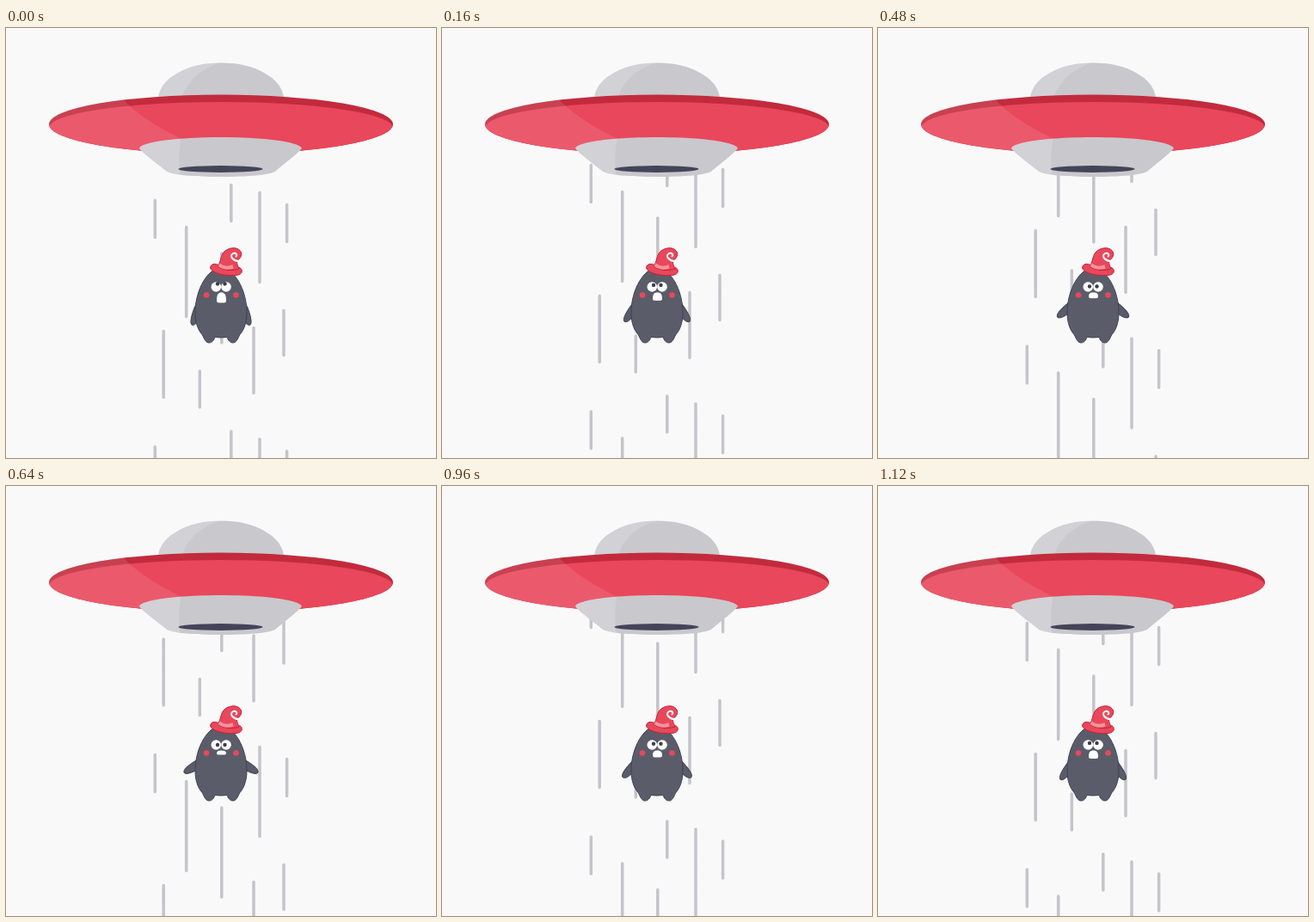
An HTML page for the animation above (1.28 s loop, 500 px wide and 500 px high).

```html
<!DOCTYPE html>
<html lang="en">
<head>
<meta charset="utf-8">
<title>Abduction</title>
<style>
  html, body { margin: 0; width: 100%; height: 100%; overflow: hidden; background: #f9f9f9; }
  svg { display: block; width: 100vw; height: 100vh; }
</style>
</head>
<body>
<svg viewBox="0 0 500 500">
  <defs>
    <clipPath id="below"><rect y="125" width="500" height="375"/></clipPath>
    <clipPath id="disc"><ellipse cx="250" cy="112" rx="200" ry="34.500"/></clipPath>
    <path id="base" d="M155 139.500C160 132 200 127 250 127C300 127 339 132 344 139.500C342 144 328 154 314 166C309 171 280 173 250 173C220 173 191 171 186 166C171 154 157 144 155 139.500Z"/>
    <clipPath id="baseClip"><use href="#base"/></clipPath>
    <path id="arm" d="M-5 -2C-5 7 -4.500 19 0 19C4.500 19 5 7 5 -2Z"/>
  </defs>

  <g clip-path="url(#below)">
    <path id="beam" fill="none" stroke="#c5c4ca" stroke-width="3.500" stroke-linecap="round"/>
  </g>

  <g id="ship">
    <path fill="#c9c8cd" d="M177 80C180 66 188 59 200 52Q220 40.500 250 40.500Q280 40.500 300 52C312 59 320 66 323 80Z"/>
    <path fill="#fff" opacity=".17" d="M177 80C180 66 188 59 200 52Q220 40.500 248 40.500C226 48 211 61 205 80Z"/>
    <g clip-path="url(#disc)">
      <path fill="#c22b3d" d="M50 77H450V150H50Z"/>
      <path fill="#e9475b" d="M50 116A200 30 0 0 1 450 116V150H50Z"/>
      <path fill="#fff" opacity=".1" d="M40 70H132L135 82Q157 106 204 129V150H40Z"/>
    </g>
    <use href="#base" fill="#c9c8cd"/>
    <path clip-path="url(#baseClip)" fill="#fff" opacity=".17" d="M150 120H205Q199 146 203 175H150Z"/>
    <ellipse cx="249.500" cy="164" rx="49" ry="3.900" fill="#444459"/>
  </g>

  <g id="creature">
    <g fill="#5a5d69" stroke="#3f4152" stroke-width="1">
      <use id="armL" href="#arm"/>
      <use id="armR" href="#arm"/>
      <path d="M250 279C265 279 280 304 280 331C280 344 276 352 271.500 357C269 363 267 366 264 366C260 366 258.500 363 257 359.500Q250 360.500 243 359.500C241.500 363 240 366 236 366C233 366 231 363 228.500 357C224 352 220 344 220 331C220 304 235 279 250 279Z"/>
    </g>
    <g fill="#e9475b">
      <circle cx="233" cy="310.500" r="3.300"/>
      <circle cx="267.500" cy="310.500" r="3.300"/>
    </g>
    <g fill="#fff">
      <circle cx="244.300" cy="301" r="5.800"/>
      <circle cx="256" cy="301" r="5.800"/>
      <path id="mouth"/>
    </g>
    <g fill="#3d3e4c">
      <circle id="pupilL" r="2.200"/>
      <circle id="pupilR" r="2.200"/>
    </g>
    <g stroke="#c3223a" stroke-width="1" stroke-linejoin="round" fill="#e9475b">
      <path d="M241 274.500C246 274 250 277 258 279C265 280 272 276 274 281C276 287 268 288.500 258 287.500C249 287 239 284 237.500 279Q237.500 275.500 241 274.500Z"/>
      <path d="M246 277C250 273 249 263 255 259C262 254 271 255 273.500 261C275 267 269 270 268.500 271C268 274 270 277 271 280C263 283 252 281.500 246 277Z"/>
      <path fill="#f4929a" stroke="none" d="M248.500 273.500C254 277.500 259 277.500 263.500 275L264.500 279.500C258 282 251 280.500 246.500 277Z"/>
      <path fill="none" stroke="#fff" stroke-width="2" stroke-linecap="round" d="M271 271.500C264 270.500 259.500 265.500 263.500 262.500C267 260.500 269.500 263.500 267.500 265.500"/>
    </g>
  </g>
</svg>
<script>
const $ = id => document.getElementById(id);
const STEP = 160, PERIOD = 286.5;

// x, top, length of each beam streak
const streaks = [
  [173.3, 200.5, 43], [183.2, 352.5, 77], [209.7, 231.5, 104], [225.3, 399, 42],
  [250.8, 262, 104], [261.8, 182.5, 42], [288, 348.5, 76], [295, 191.5, 104],
  [323, 328.5, 52], [326.6, 205.5, 43]
];

// Poses from fully scared to calm; the loop runs there and back
const poses = [
  { rise: 0, arm: 21, drop: 4, look: -3.5, mouth: 12 },
  { rise: 41, arm: 36, drop: 2.5, look: -2, mouth: 9.5 },
  { rise: 79, arm: 44, drop: 1.5, look: -1.2, mouth: 8 },
  { rise: 117, arm: 51, drop: .7, look: -.5, mouth: 6.8 },
  { rise: 174.5, arm: 59, drop: 0, look: 0, mouth: 5 }
];

function beamPath(rise) {
  let d = '';
  for (const [x, top, len] of streaks) {
    for (let k = -1; k < 3; k++) {
      d += `M${x} ${top - rise + k * PERIOD}v${len}`;
    }
  }
  return d;
}

function mouthPath(h) {
  const r = Math.min(2.5, h / 3), top = 307.5, end = top + h;
  return `M245 ${end - r}C245 ${top + h * .2} 247 ${top} 250.5 ${top}` +
    `C254 ${top} 256 ${top + h * .2} 256 ${end - r}` +
    `Q256 ${end} ${256 - r} ${end}H${245 + r}Q245 ${end} 245 ${end - r}Z`;
}

function place(id, x, y) {
  $(id).setAttribute('cx', x);
  $(id).setAttribute('cy', y);
}

function draw(ms) {
  const i = Math.floor(ms / STEP) % 8;
  const p = poses[i < 5 ? i : 8 - i];
  const y = 323.5 + p.drop;
  $('beam').setAttribute('d', beamPath(p.rise));
  $('armL').setAttribute('transform', `translate(223.5 ${y}) rotate(${p.arm})`);
  $('armR').setAttribute('transform', `translate(276.5 ${y}) rotate(${-p.arm})`);
  $('mouth').setAttribute('d', mouthPath(p.mouth));
  place('pupilL', 246, 301 + p.look);
  place('pupilR', 254.5, 301 + p.look);
}

let start;
function tick(now) {
  start ??= now;
  draw(now - start);
  requestAnimationFrame(tick);
}
draw(0);
requestAnimationFrame(tick);
</script>
</body>
</html>
```
